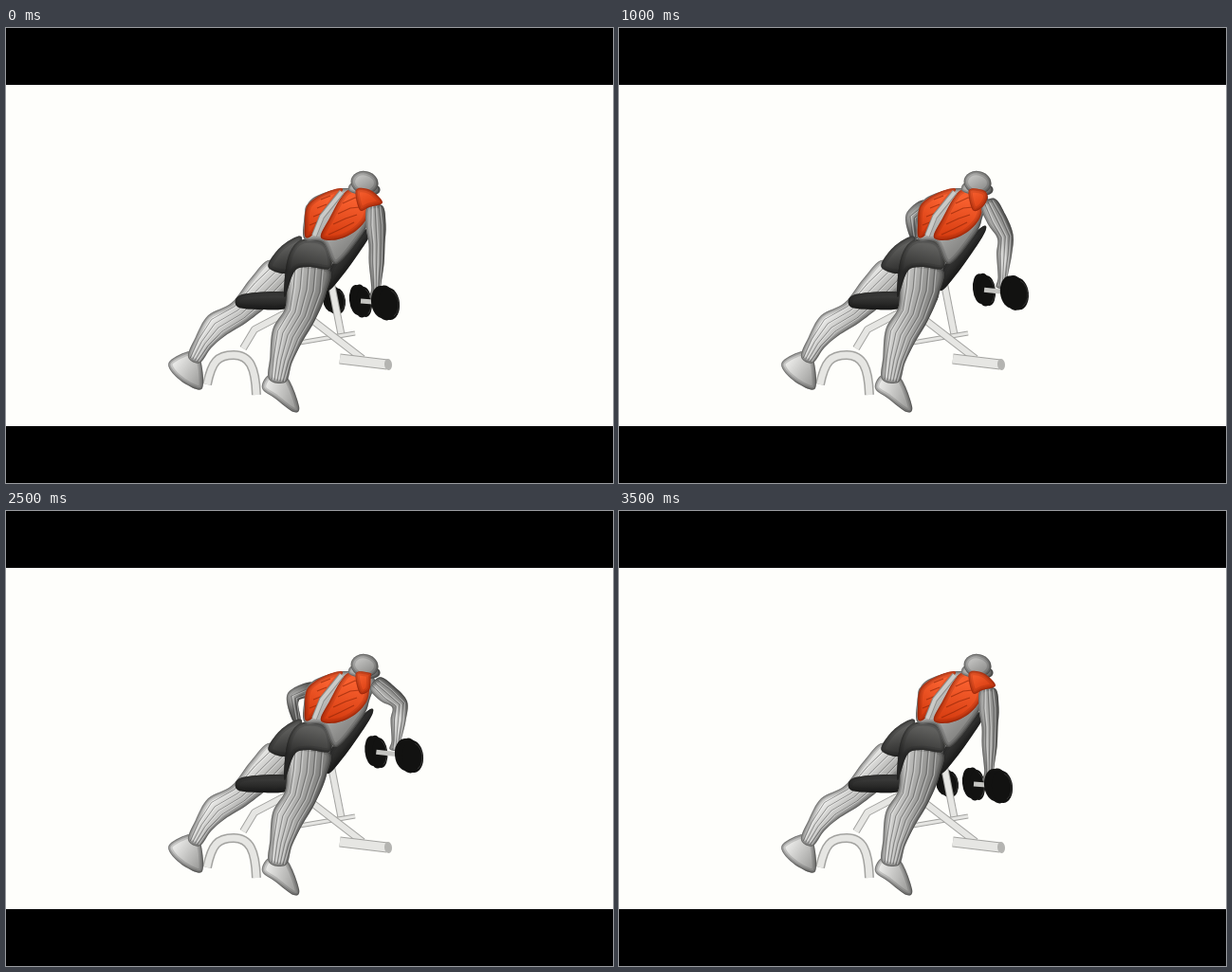
Write an HTML page with a canvas that moves like this. It is 640 px wide and 480 px high and loops after 3.67 s.

```html
<!DOCTYPE html>
<html lang="en">
<head>
<meta charset="utf-8">
<title>Incline dumbbell row</title>
<style>
  html, body { margin: 0; width: 100%; height: 100%; overflow: hidden; background: #000; }
  canvas { display: block; width: 640px; height: 480px; }
</style>
</head>
<body>
<canvas id="stage" width="640" height="480"></canvas>
<script>
const ctx = document.getElementById('stage').getContext('2d');
const LOOP = 3670, STEP = 1000 / 6;
const PALE = ['#ededeb', '#a0a09e'], SKIN = ['#cfcfcd', '#747472'], ORANGE = ['#f8602f', '#d63c10'];
const SHORTS = ['#60605e', '#2b2b2a'], PAD = ['#434342', '#1c1c1b'], METAL = '#e6e6e3';

// Closed Catmull-Rom curve through points
function blob(points) {
  const n = points.length, at = i => points[(i + n) % n];
  const path = new Path2D();
  path.moveTo(...points[0]);
  points.forEach((b, i) => {
    const a = at(i - 1), c = at(i + 1), d = at(i + 2);
    path.bezierCurveTo(b[0] + (c[0] - a[0]) / 6, b[1] + (c[1] - a[1]) / 6,
      c[0] - (d[0] - b[0]) / 6, c[1] - (d[1] - b[1]) / 6, ...c);
  });
  path.closePath();
  return path;
}

// Fills a path with light running from one point to another and darkens its rim
function volume(path, [light, dark], [x0, y0], [x1, y1], edge = '#1c1c1b') {
  const shade = ctx.createLinearGradient(x0, y0, x1, y1);
  shade.addColorStop(0, light);
  shade.addColorStop(1, dark);
  ctx.save();
  ctx.fillStyle = shade;
  ctx.fill(path);
  ctx.clip(path);
  ctx.strokeStyle = edge;
  for (const width of [2, 5, 9]) {
    ctx.lineWidth = width;
    ctx.globalAlpha = .12 + .4 / width;
    ctx.stroke(path);
  }
  ctx.restore();
}

function line(points, color, width) {
  ctx.beginPath();
  points.forEach(p => ctx.lineTo(...p));
  ctx.strokeStyle = color;
  ctx.lineWidth = width;
  ctx.stroke();
}

// Tapered limb along joints [x, y, radius], with muscle fibres running through it
function limb(joints, colors, fibres = 4) {
  const side = k => joints.map(([x, y, r], i) => {
    const a = joints[Math.max(0, i - 1)], b = joints[Math.min(joints.length - 1, i + 1)];
    const dx = b[0] - a[0], dy = b[1] - a[1], len = Math.hypot(dx, dy);
    return [x - dy / len * r * k, y + dx / len * r * k];
  });
  const left = side(1), right = side(-1);
  volume(blob([...left, ...right.reverse()]), colors, left[1], right.at(-2));
  for (let i = 1; i <= fibres; i++) {
    const across = side(i * 2 / (fibres + 1) - 1);
    line(across, '#33333270', 1);
    line(across.map(([x, y]) => [x + 1.5, y]), '#ffffff60', 1);
  }
}

function disc(x, y, rx, ry, color) {
  ctx.beginPath();
  ctx.ellipse(x, y, rx, ry, -.1, 0, 7);
  ctx.fillStyle = color;
  ctx.fill();
}

function weight(x, y, rx, ry) {
  for (let i = -1; i <= 1; i++) {
    disc(x + i * 4, y + i, rx - 4, ry - Math.abs(i) * 1.5, '#121211');
    ctx.beginPath();
    ctx.ellipse(x + i * 4, y + i, rx - 5, ry - 4, -.1, -1.2, 1.2);
    ctx.strokeStyle = '#353534';
    ctx.lineWidth = 1;
    ctx.stroke();
  }
}

function tube(points, width) {
  line(points, '#a3a3a0', width);
  line(points, METAL, width - 2);
}

function bench() {
  tube([[343, 270], [354, 326]], 8);
  tube([[250, 338], [262, 318], [300, 298]], 8);
  tube([[280, 337], [368, 322]], 5);
  tube([[315, 302], [376, 349]], 8);
  tube([[352, 349], [402, 355]], 11);
  disc(403, 355, 4, 6, '#b4b4b1');
  const arch = new Path2D('M212 376C217 352 223 345 240 345S263 358 264 387');
  for (const [color, width] of [['#a3a3a0', 10], [METAL, 7]]) {
    ctx.strokeStyle = color;
    ctx.lineWidth = width;
    ctx.stroke(arch);
  }
}

function lowerBody() {
  volume(blob([[194, 341], [173, 351], [174, 362], [190, 376], [207, 380], [205, 350]]), PALE, [178, 350], [206, 370]);
  limb([[290, 256, 16], [270, 276, 17], [246, 300, 13], [222, 314, 14], [208, 332, 10], [198, 350, 7]], PALE);
  volume(blob([[249, 281], [298, 279], [298, 295], [270, 297], [244, 294]]), PAD, [270, 279], [270, 296]);
  volume(blob([[277, 366], [270, 380], [284, 391], [303, 405], [309, 399], [296, 368]]), PALE, [272, 380], [306, 390]);
  limb([[319, 252, 21], [317, 276, 21], [310, 302, 17], [297, 324, 17], [290, 350, 12], [286, 372, 9]], SKIN, 5);
  volume(blob([[277, 253], [284, 237], [299, 224], [312, 222], [300, 257]]), SHORTS, [292, 230], [298, 258]);
  volume(blob([[298, 240], [307, 226], [321, 222], [336, 226], [343, 240], [341, 254], [318, 252], [304, 257],
    [294, 284], [294, 262]]), SHORTS, [320, 228], [312, 260]);
}

function back() {
  volume(blob([[315, 223], [314, 204], [319, 184], [335, 174], [360, 169], [388, 176], [383, 200], [376, 217],
    [348, 249], [334, 226]]), SKIN, [325, 190], [372, 240]);
  volume(blob([[316, 221], [315, 208], [318, 187], [336, 174], [355, 170], [340, 191], [325, 216]]),
    ORANGE, [340, 182], [318, 215], '#6b1500');
  volume(blob([[332, 221], [341, 201], [359, 172], [380, 172], [382, 196], [370, 213], [350, 223]]),
    ORANGE, [358, 180], [354, 222], '#6b1500');
  for (let i = 0; i < 4; i++) {
    const x = 340 + i * 5, y = 218 - i * 11;
    line([[x, y], [x + 13, y - 6], [x + 27 - i * 2, y - 13 + i * 3]], '#8d2508a0', 1.2);
    line([[320 + i * 4, 208 - i * 9], [330 + i * 4, 204 - i * 9]], '#8d2508a0', 1.2);
  }
  for (const [color, width] of [['#8e8e8b', 6], ['#cacac7', 4]]) {
    line([[325, 219], [333, 199], [354, 173]], color, width);
  }
}

function head() {
  volume(blob([[362, 172], [366, 163], [391, 166], [393, 174], [380, 177]]), SKIN, [365, 165], [392, 174]);
  const skull = new Path2D();
  skull.ellipse(378, 163, 14.5, 12, .2, 0, 7);
  volume(skull, ['#c4c4c2', '#858583'], [374, 154], [386, 174]);
}

function draw(lift) {
  const turn = lift * Math.PI / 2, swing = Math.sin(turn), drop = Math.cos(turn);
  const rise = 44 * (1 - drop);
  const front = [400 + 26 * swing, 290 - rise];
  const rear = [front[0] - 26 - 9 * swing, front[1] - 2 - 2 * swing];
  const hand = [(front[0] + rear[0]) / 2 + 3, (front[1] + rear[1]) / 2 - 4];
  const shoulder = [389, 188 - 7 * swing];
  const elbow = [391 + 25 * swing, 195 + 33 * drop];
  const between = (a, b, k) => [a[0] + (b[0] - a[0]) * k, a[1] + (b[1] - a[1]) * k];

  ctx.fillStyle = '#000';
  ctx.fillRect(0, 0, 640, 480);
  ctx.fillStyle = '#fefefb';
  ctx.fillRect(0, 60, 640, 360);

  weight(346 - 32 * swing, 287 - rise, 12, 15);
  bench();
  volume(blob([[381, 211], [386, 215], [366, 246], [343, 275], [337, 272], [346, 246]]), PAD, [355, 230], [370, 243]);
  limb([[325, 188, 8], [322 - 20 * swing, 206 - 10 * swing, 7], [321 - 15 * swing, 221, 4]], SKIN, 2);
  lowerBody();
  back();
  head();

  weight(...rear, 12, 17.5);
  line([rear, front], '#c4c4c1', 5);
  limb([[...shoulder, 8], [...between(shoulder, elbow, .5), 10.5], [...elbow, 8.5],
    [...between(elbow, hand, .35), 8], [...between(elbow, hand, .8), 5], [...hand, 6]], SKIN, 3);
  volume(blob([[369, 171], [384, 171], [397 - 13 * swing, 184 - 9 * swing], [383, 189], [373, 192]]),
    ORANGE, [372, 171], [385, 192], '#6b1500');
  weight(...front, 15, 18.5);
}

const clamp = v => Math.min(1, Math.max(0, v));

function liftAt(ms) {
  const up = clamp((ms - 300) / 1500);
  const down = clamp((ms - 1950) / 1480);
  return up * up * (3 - 2 * up) - down ** 1.75;
}

ctx.lineJoin = 'round';
let start;
function tick(now) {
  start ??= now;
  // Hold each pose; pose changes fall on the nearest 10 ms
  const step = Math.floor(((now - start) % LOOP + 5) / STEP);
  draw(liftAt(step * STEP));
  requestAnimationFrame(tick);
}
requestAnimationFrame(tick);
</script>
</body>
</html>
```
